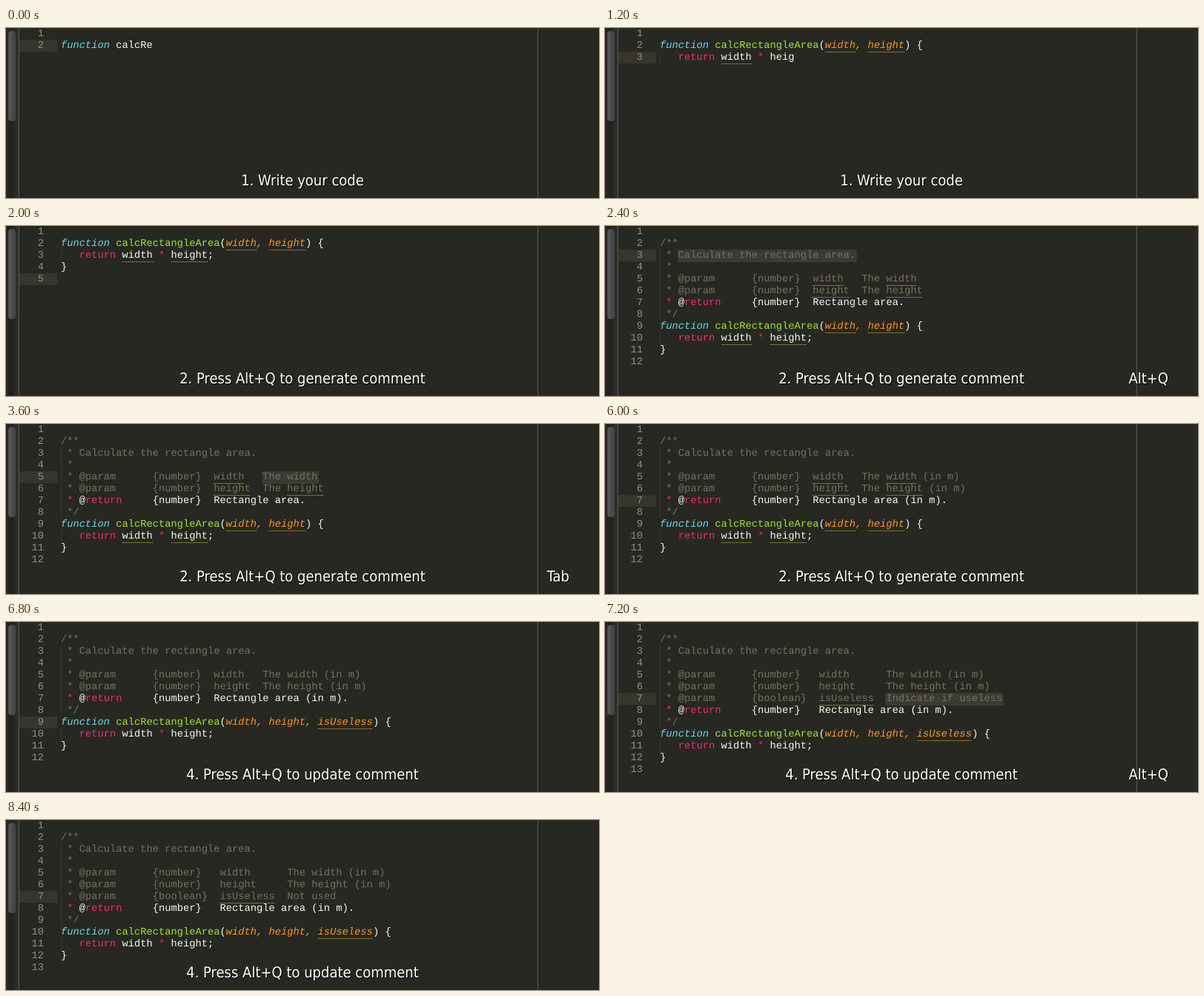
These frames come from a looping animation (800 px wide and 230 px high, 9200 ms). An HTML page:

```html
<!DOCTYPE html>
<html lang="en">
<head>
<meta charset="utf-8">
<title>Comment generator demo</title>
<style>
  html, body { margin: 0; width: 100%; height: 100%; overflow: hidden; background: #272822; }
  svg { display: block; }
  text { white-space: pre; text-rendering: geometricPrecision; }
  .code { font: 13.75px "Liberation Mono", monospace; fill: #f8f8f2; }
  .caption { font: condensed 20px "DejaVu Sans Condensed", "DejaVu Sans", sans-serif; fill: #fff; }
  .shadow { fill: #000; }
  .number { fill: #8f908a; }
  .storage { fill: #66d9ef; font-style: italic; }
  .name { fill: #a6e22e; }
  .param { fill: #fd971f; font-style: italic; }
  .keyword { fill: #f92672; }
  .comment { fill: #75715e; }
  .space { fill: #55534a; }
  .active { fill: #37362c; }
  .selection { fill: #3b3b34; }
  .mark { stroke: #cdb842; stroke-dasharray: 1 1; }
  .guide { stroke: #45463d; stroke-dasharray: 1 1; }
</style>
</head>
<body>
<svg width="800" height="230" viewBox="0 0 800 230">
  <defs>
    <linearGradient id="track">
      <stop stop-color="#292927"/><stop offset=".45" stop-color="#20201e"/><stop offset="1" stop-color="#323230"/>
    </linearGradient>
    <linearGradient id="thumb"><stop stop-color="#5a5a5a"/><stop offset="1" stop-color="#414141"/></linearGradient>
  </defs>
  <rect width="17" height="230" fill="url(#track)"/>
  <rect x="3.5" y="4.5" width="9" height="121" rx="3" fill="url(#thumb)" stroke="#4b4b4b"/>
  <path d="M17.5 0V230M717.5 0V230" stroke="#555651"/>
  <g id="view"></g>
</svg>
<script>
const LOOP = 9200, STEP = 400, LEFT = 74, CHAR = 8.25, ROW = 16;
const view = document.getElementById('view');

// Each cue starts at a step and holds until the next one.
const cursors = [
  [0, 2], [2, 3], [4, 5], [6, 3, 'Calculate the rectangle area.'],
  [9, 5, 'The width'], [10, 5], [11, 6, 'The height'], [12, 6],
  [13, 7, 'Rectangle area.'], [14, 7], [16, 9], [18, 7, 'Indicate if useless'], [21, 7]
];
const captions = [
  [0, '1. Write your code'], [5, '2. Press Alt+Q to generate comment'],
  [16, '3. Update your code'], [17, '4. Press Alt+Q to update comment']
];
const keys = [[0, ''], [6, 'Alt+Q'], [8, ''], [9, 'Tab'], [15, ''], [18, 'Alt+Q'], [20, '']];
const cueAt = (cues, step) => cues.filter(cue => cue[0] <= step).pop();

const span = (type, text) => `<tspan class="${type}">${text}</tspan>`;
const column = index => LEFT + index * CHAR;

function commentLines(step) {
  const wide = step >= 18;
  const unit = from => step >= from ? ' (in m)' : '';
  const tag = (label, type, rest) =>
    ` * ${label.padEnd(12)}${`{${type}}`.padEnd(wide ? 11 : 10)}${rest}`;
  const param = (type, name, text) => tag('@param', type, name.padEnd(wide ? 11 : 8) + text);
  return [
    '/**', ' * Calculate the rectangle area.', ' *',
    param('number', 'width', 'The width' + unit(10)),
    param('number', 'height', 'The height' + unit(12)),
    ...(wide ? [param('boolean', 'isUseless', step >= 21 ? 'Not used' : 'Indicate if useless')] : []),
    tag('@return', 'number', `Rectangle area${unit(14)}.`),
    ' */'
  ];
}

function codeLines(step) {
  const extra = step < 16 ? '' : step < 17 ? ', isUs' : ', isUseless';
  const code = `function calcRectangleArea(width, height${extra}) {\n   return width * height;\n}\n`;
  const typed = [15, 31, 50, 66][step] ?? code.length;
  return ['', ...(step >= 6 ? commentLines(step) : []), ...code.slice(0, typed).split('\n')];
}

function colour(line, selected) {
  if (/^\/\*| \*[ \/]?/.test(line) && !line.includes('return ')|| line === ' *') {
    const text = selected ? line.replace(selected, selected.replace(/ /g, span('space', '·'))) : line;
    return span('comment', text);
  }
  const head = line.match(/^function (\w+)\((.*)\)(.*)$/);
  if (head) {
    return `${span('storage', 'function')} ${span('name', head[1])}(${span('param', head[2])})${head[3]}`;
  }
  return line.replace(/function|return|\*/g, word => span(word === 'function' ? 'storage' : 'keyword', word));
}

function drawLine(line, index, step, active, selection) {
  const top = index * ROW, baseline = top + 11;
  const selected = index + 1 === active ? selection : '';
  const start = selected ? line.indexOf(selected) : Infinity;
  let out = '';
  if (index + 1 === active) out += `<rect class="active" x="18" y="${top}" width="51" height="${ROW}"/>`;
  if (selected) {
    out += `<rect class="selection" x="${column(start) - 1}" y="${top}" rx="2"
      width="${selected.length * CHAR + 2.5}" height="${ROW + 1}"/>`;
  }
  if (line[0] === ' ') out += `<path class="guide" d="M74.5 ${top}v${ROW}"/>`;
  out += `<text class="code number" x="51" y="${baseline}" text-anchor="end">${index + 1}</text>`;
  out += `<text class="code" x="${LEFT}" y="${baseline}">${colour(line, selected)}</text>`;

  const marked = step < 16 ? /\b(width|height)\b/g : /\bisUseless\b/g;
  for (const { 0: word, index: at } of line.matchAll(marked)) {
    if (at < start) {
      out += `<path class="mark" d="M${Math.round(column(at))} ${top + ROW + .5}h${Math.round(word.length * CHAR)}"/>`;
    }
  }
  return out;
}

const drawCaption = (text, x, anchor) => [['shadow', 1], ['', 0]].map(([type, shift]) =>
  `<text class="caption ${type}" x="${x + shift}" y="${213 + shift}" text-anchor="${anchor}">${text}</text>`).join('');

function draw(step) {
  const [, active, selection] = cueAt(cursors, step);
  view.innerHTML =
    codeLines(step).map((line, index) => drawLine(line, index, step, active, selection)).join('') +
    drawCaption(cueAt(captions, step)[1], 400, 'middle') +
    drawCaption(cueAt(keys, step)[1], 760, 'end');
}

let shown = -1;
function tick() {
  const step = Math.floor(performance.now() % LOOP / STEP);
  if (step !== shown) draw(shown = step);
  requestAnimationFrame(tick);
}
tick();
</script>
</body>
</html>
```
